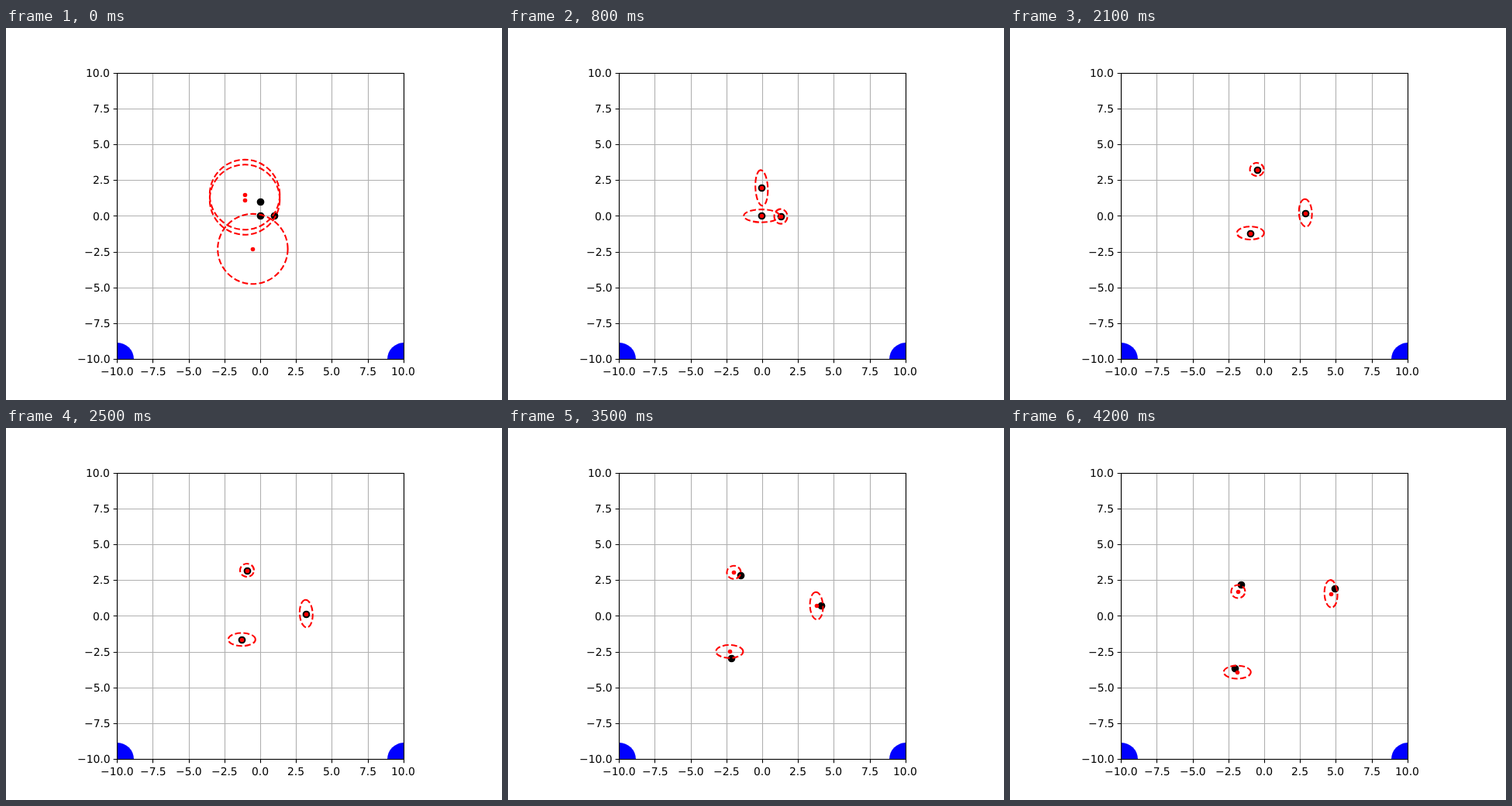
These frames come from a looping animation (640 by 480 pixels, 4300 ms). An HTML page:

```html
<!DOCTYPE html>
<html lang="en">
<head>
<meta charset="utf-8">
<title>Position tracking</title>
<style>
  html, body { margin: 0; width: 100%; height: 100%; overflow: hidden; background: #fff; }
  svg { display: block; }
  text { font: 13.889px "DejaVu Sans", sans-serif; fill: #000; text-rendering: geometricPrecision; }
</style>
</head>
<body>
<svg id="stage" width="640" height="480" viewBox="0 0 640 480">
  <defs><clipPath id="plot"><rect x="143" y="58" width="370.5" height="369.5"/></clipPath></defs>
</svg>
<script>
const NS = "http://www.w3.org/2000/svg";
const stage = document.getElementById("stage");
const UNIT = 18.48, STEP = 100, LOOP = 4300;

const px = x => 328 + x * UNIT;
const py = y => 242.4 - y * UNIT;
const snap = v => Math.floor(v + 0.5) + 0.5;
const mix = (a, b, u) => a.map((v, i) => v + (b[i] - v) * u);

function add(parent, tag, attrs, text) {
  const el = document.createElementNS(NS, tag);
  for (const key in attrs) el.setAttribute(key, attrs[key]);
  if (text) el.textContent = text;
  parent.appendChild(el);
  return el;
}

// Layers from back to front
const grid = add(stage, "g", { stroke: "#b0b0b0", "stroke-width": 1.11 });
const marks = add(stage, "g", { "clip-path": "url(#plot)" });
const axes = add(stage, "g", { stroke: "#000", "stroke-width": 1.11, fill: "none" });
const labels = add(stage, "g", {});

function drawAxes() {
  const x0 = snap(px(-10)), x1 = snap(px(10)), y0 = snap(py(10)), y1 = snap(py(-10));
  for (let v = -10; v <= 10; v += 2.5) {
    const x = snap(px(v)), y = snap(py(v));
    const label = (v < 0 ? "\u2212" : "") + Math.abs(v).toFixed(1);
    add(grid, "path", { d: `M${x} ${y1}V${y0}M${x0} ${y}H${x1}` });
    add(axes, "path", { d: `M${x} ${y1}v4.86M${x0} ${y}h-4.86` });
    const below = add(labels, "text", { y: 448 }, label);
    const beside = add(labels, "text", { y: Math.round(py(v) + 5.2) }, label);
    const width = below.getComputedTextLength();
    below.setAttribute("x", Math.round(px(v) - width / 2));
    beside.setAttribute("x", Math.round(134.3 - width));
  }
  add(axes, "rect", { x: x0, y: y0, width: x1 - x0, height: y1 - y0 });
}

// Times in steps of 100 ms
const KEYS = [0, 8, 15, 21, 29, 35, 42];
const FIX = 3; // first correction: the wide circles collapse

// start: first guess; path: true place at KEYS; miss: guess error at steps 15, 35 and 42;
// early, late: ring radii in pixels before and after the bodies spread out
const bodies = [
  {
    start: [-0.52, -2.31],
    path: [[0, 0], [-0.04, 0], [-0.51, -0.7], [-0.96, -1.2], [-1.6, -2.1], [-2.14, -2.93], [-2.03, -3.68]],
    miss: [[0.28, -0.03], [-0.14, 0.44], [0.15, -0.25]],
    early: [23, 8.3], late: [17.5, 8.4]
  },
  {
    start: [-1.08, 1.48],
    path: [[0, 1], [-0.04, 1.95], [-0.24, 2.7], [-0.51, 3.24], [-1.33, 3.13], [-1.49, 2.86], [-1.65, 2.21]],
    miss: [[0.58, 0], [-0.49, 0.18], [-0.17, -0.51]],
    early: [8, 23], late: [9, 8.5]
  },
  {
    start: [-1.08, 1.13],
    path: [[1, 0], [1.3, -0.04], [2.35, 0.37], [2.88, 0.21], [3.54, 0.1], [4.1, 0.7], [4.9, 1.89]],
    miss: [[0.05, -0.09], [-0.31, 0], [-0.24, -0.35]],
    early: [8.5, 9.5], late: [8.4, 17.8]
  }
];

function along(points, t) {
  let i = 0;
  while (i < KEYS.length - 2 && t >= KEYS[i + 1]) i++;
  return mix(points[i], points[i + 1], (t - KEYS[i]) / (KEYS[i + 1] - KEYS[i]));
}

function radii(b, t) {
  if (t < FIX) return [45.2 + 1.4 * t, 45.2 + 1.4 * t];
  return mix(b.early, b.late, Math.min(1, Math.max(0, (t - 8) / 7)));
}

function place(el, [x, y]) {
  el.setAttribute("cx", snap(px(x)));
  el.setAttribute("cy", snap(py(y)));
}

// The dashes begin at the end of the long axis
function drawRing(el, [x, y], [rx, ry]) {
  const a = Math.max(rx, ry), b = Math.min(rx, ry);
  const turn = ry > rx ? -93 : 0;
  el.setAttribute("d", `M${a} 0A${a} ${b} 0 0 0 ${-a} 0A${a} ${b} 0 0 0 ${a} 0`);
  el.setAttribute("transform", `translate(${px(x)} ${py(y)}) rotate(${turn})`);
}

drawAxes();
for (const x of [-10, 10]) place(add(marks, "circle", { r: 21.5, fill: "#00f" }), [x, -10]);
for (const b of bodies) b.dot = add(marks, "circle", { r: 4.86, fill: "#000" });
for (const b of bodies) {
  const [first, second, third] = b.miss, none = [0, 0];
  b.error = [none, none, first, none, none, second, third];
  b.ring = add(marks, "path", {
    fill: "none", stroke: "#f00", "stroke-width": 2.08, "stroke-dasharray": "7.71 3.33"
  });
  b.mean = add(marks, "circle", { r: 2.78, fill: "#f00" });
}

function render(ms) {
  const t = Math.floor((ms % LOOP) / STEP);
  for (const b of bodies) {
    const spot = along(b.path, t);
    const error = along(b.error, t);
    const guess = t < FIX ? b.start : spot.map((v, i) => v + error[i]);
    place(b.dot, spot);
    place(b.mean, guess);
    drawRing(b.ring, guess, radii(b, t));
  }
}

let start = null;
function tick(now) {
  if (start === null) start = now;
  render(now - start);
  requestAnimationFrame(tick);
}
render(0);
requestAnimationFrame(tick);
</script>
</body>
</html>
```
